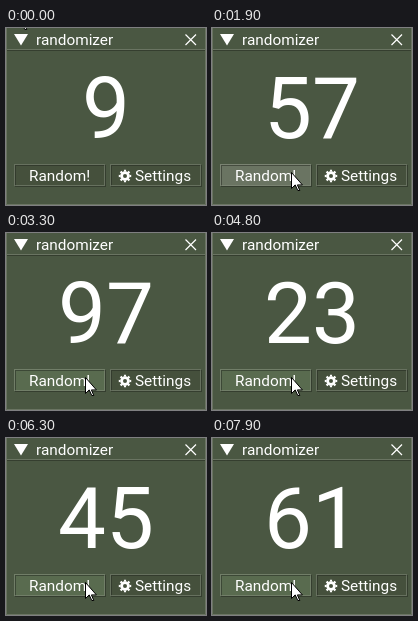
An HTML page for the animation above (8000 ms loop, 200 px wide and 177 px high).

```html
<!DOCTYPE html>
<html lang="en">
<head>
<meta charset="utf-8">
<title>randomizer</title>
<style>
  html, body { margin: 0; width: 100%; height: 100%; overflow: hidden; background: #4a5742; }
  svg { display: block; width: 200px; height: 177px; font: 15.36px Roboto, sans-serif; fill: #fff; }
  .line { fill: none; stroke: #8a9182; stroke-opacity: .5; }
  .shade { fill: none; stroke: #242920; stroke-opacity: .52; }
  .face { fill: #45503c; }
  .hover { fill: #596b4f; }
  .active { fill: #6a7462; }
  #number { font-size: 85.33px; text-anchor: middle; }
</style>
</head>
<body>
<svg viewBox="0 0 200 177">
  <rect width="200" height="177" fill="#4a5742"/>
  <path class="shade" d="M1 22.5H199"/>
  <path class="line" d="M.5 0V176.5H199.5V0M1 21.5H199"/>
  <path d="M8 6H22L15 17.5Z"/>
  <text x="30" y="17">randomizer</text>
  <path d="M179.5 6.5l10.5 10.5M190 6.5l-10.5 10.5" stroke="#fff" stroke-width="1.2"/>

  <text id="number" x="100" y="110">9</text>

  <g id="random">
    <rect id="face" class="face" x="8" y="136" width="91" height="22"/>
    <rect class="shade" x="9.5" y="137.5" width="90" height="21"/>
    <rect class="line" x="8.5" y="136.5" width="90" height="21"/>
    <text x="23" y="153">Random!</text>
  </g>
  <g>
    <rect class="face" x="104" y="136" width="91" height="22"/>
    <rect class="shade" x="105.5" y="137.5" width="90" height="21"/>
    <rect class="line" x="104.5" y="136.5" width="90" height="21"/>
    <g transform="translate(119 148)" fill="none" stroke="#fff">
      <circle r="3.4" stroke-width="2.8"/>
      <circle r="5.3" stroke-width="1.9" pathLength="16" stroke-dasharray="1 1" stroke-dashoffset=".5"/>
    </g>
    <text x="129" y="153">Settings</text>
  </g>

  <path id="cursor" d="M.5 .5v16l3.7-3.6 2.6 5.6h2l-2.4-5.6h5z" stroke="#000"/>
</svg>
<script>
const LOOP = 8000;
const $ = id => document.getElementById(id);

// pointer: [start, x, y]
const moves = [[0, 12, -17], [200, 12, -60], [1000, 75, 167], [1100, 79, 144]];

// clicks: [press, release, number, delay until the number shows]
const clicks = [
  [1200, 1300, 74], [1500, 1600, 57], [1900, 2000, 14], [2200, 2400, 91],
  [2700, 2800, 62], [3100, 3200, 97, 100], [3600, 3700, 80, 100],
  [4100, 4300, 32], [4600, 4800, 23], [5100, 5100, 68], [5100, 5300, 83],
  [5600, 5700, 71], [6100, 6300, 45], [6700, 6900, 86, 100],
  [7300, 7400, 38], [7800, 7900, 61]
];

function draw(t) {
  const [, x, y] = moves.filter(m => m[0] <= t).pop();
  const held = clicks.some(([press, release]) => t >= press && t < release);
  const shown = clicks.filter(([, release, , delay = 0]) => t >= release + delay).pop();
  $('cursor').setAttribute('transform', `translate(${x} ${y})`);
  $('face').setAttribute('class', held ? 'active' : t >= 1100 ? 'hover' : 'face');
  $('number').textContent = shown ? shown[2] : 9;
}

const start = performance.now();
function tick() {
  draw((performance.now() - start) % LOOP);
  requestAnimationFrame(tick);
}
draw(0);
requestAnimationFrame(tick);
</script>
</body>
</html>
```
